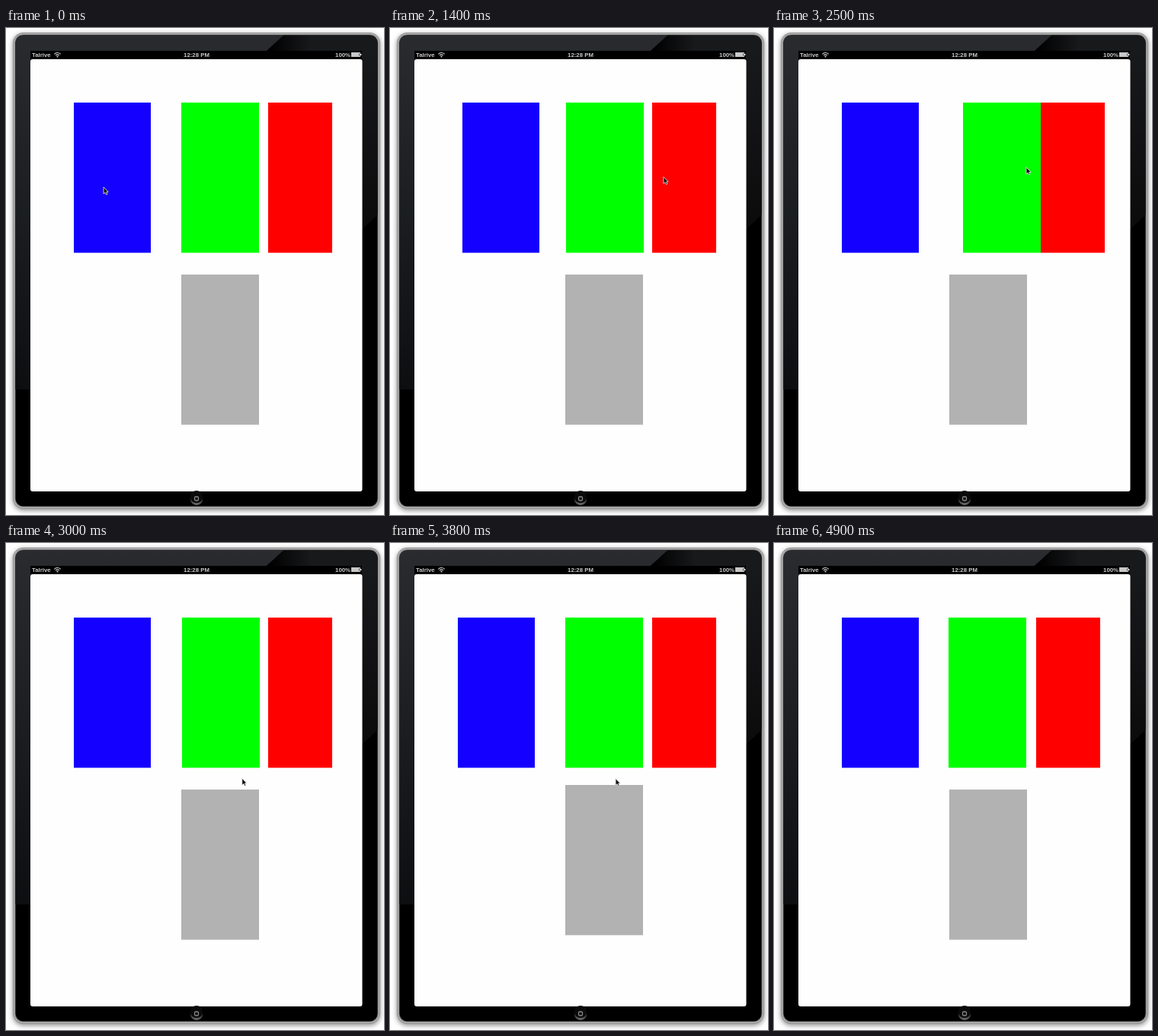
Recreate the animation shown at these times as an HTML page with a canvas. Size 496x640 px, loop 6000 ms.

```html
<!DOCTYPE html>
<html lang="en">
<head>
<meta charset="utf-8">
<title>Springy blocks</title>
<style>
html, body { margin: 0; width: 100%; height: 100%; overflow: hidden; background: #fff; }
canvas { display: block; }
</style>
</head>
<body>
<canvas id="stage" width="496" height="640"></canvas>
<script>
const ctx = document.getElementById('stage').getContext('2d');
const LOOP = 6000, STEP = 100, REST = 4900;

function inset(amount, radius, fill) {
  ctx.beginPath();
  ctx.roundRect(9 + amount, 6 + amount, 482 - 2 * amount, 626 - 2 * amount, radius);
  ctx.fillStyle = fill;
  ctx.fill();
}

function polygon(points, fill) {
  ctx.beginPath();
  points.forEach(([x, y]) => ctx.lineTo(x, y));
  ctx.closePath();
  ctx.fillStyle = fill;
  ctx.fill();
}

function gradient(x0, y0, x1, y1, ...colors) {
  const g = ctx.createLinearGradient(x0, y0, x1, y1);
  colors.forEach((c, i) => g.addColorStop(i / (colors.length - 1), c));
  return g;
}

function arc(x, y, r, from = 0, to = 2 * Math.PI) {
  ctx.beginPath();
  ctx.arc(x, y, r, from, to);
}

function drawDevice() {
  ctx.fillStyle = '#fff';
  ctx.fillRect(0, 0, 496, 640);

  ctx.save();
  ctx.shadowColor = 'rgba(0,0,0,.45)';
  ctx.shadowBlur = 6;
  ctx.shadowOffsetY = 2;
  inset(0, 14, '#929292');
  ctx.restore();
  inset(1, 13, '#b4b4b4');
  inset(2.5, 11, '#747474');
  inset(3.5, 10, '#000');

  // Glass reflection, cut by a diagonal edge along the top
  ctx.save();
  ctx.clip();
  polygon([[12, 9], [365, 9], [342, 30], [32, 30], [32, 475], [12, 475]],
    gradient(0, 9, 0, 475, '#292b2f', '#1b1e21', '#0c0e10'));
  polygon([[365, 9], [488, 9], [488, 30], [342, 30]],
    gradient(345, 0, 400, 0, '#000', '#18191b'));
  polygon([[467, 30], [488, 30], [488, 245], [467, 265]],
    gradient(0, 30, 0, 265, '#18191b', '#0b0b0c'));
  ctx.restore();

  ctx.fillStyle = '#000';
  ctx.fillRect(32, 30, 435, 20);
  ctx.beginPath();
  ctx.roundRect(32, 41, 435.5, 568, 3);
  ctx.fillStyle = '#fefefe';
  ctx.fill();
  drawHomeButton();
  drawStatusBar();
}

function drawHomeButton() {
  arc(250, 618.5, 8.5);
  ctx.fillStyle = gradient(0, 610, 0, 627, '#050505', '#111', '#777');
  ctx.fill();
  arc(250, 616, 8);
  ctx.fillStyle = '#0a0a0a';
  ctx.fill();
  ctx.strokeStyle = '#8a8a8a';
  ctx.lineWidth = 1.3;
  ctx.beginPath();
  ctx.roundRect(247.5, 616, 5, 5, 1.6);
  ctx.stroke();
}

function label(text, x, align) {
  ctx.textAlign = align;
  ctx.fillText(text, x, 38);
}

function drawStatusBar() {
  ctx.font = 'bold 7.8px "Liberation Sans", Arial, sans-serif';
  ctx.fillStyle = ctx.strokeStyle = '#c8c8c8';
  label('Talrive', 34, 'left');
  label('12:28 PM', 250, 'center');
  label('100%', 452, 'right');

  ctx.lineWidth = 1.2;
  for (const r of [3, 5.5]) {
    arc(67.5, 38, r, -Math.PI * 0.77, -Math.PI * 0.23);
    ctx.stroke();
  }
  arc(67.5, 37.5, 1.1);
  ctx.fill();

  ctx.lineWidth = 1;
  ctx.strokeRect(453.5, 32.5, 11, 5);
  ctx.fillRect(454, 33, 9.5, 4);
  ctx.fillRect(465, 34, 1.5, 2);
}

// A push away from home, followed by a damped spring back
function pulse(t, start, peak, size) {
  if (t <= start) return 0;
  if (t < peak) return size * Math.sin((t - start) / (peak - start) * Math.PI / 2);
  const s = (t - peak) / 1000, damping = 3.9, speed = 5.2;
  return size * Math.exp(-damping * s) *
    (Math.cos(speed * s) + damping / speed * Math.sin(speed * s));
}

function drawBlock(x, y, w, color) {
  ctx.fillStyle = color;
  ctx.fillRect(Math.round(x), Math.round(y), w, 197.4);
}

function drawBlocks(t) {
  const blueX = pulse(t, 700, 1050, 48);
  const greenX = pulse(t, 850, 1050, 10) + pulse(t, 2300, 2600, 20.5) + pulse(t, 4200, 4400, 10);
  const greenY = pulse(t, 4200, 4400, -0.8);
  const redX = pulse(t, 750, 1000, 7.2) + pulse(t, 2400, 2600, 9);
  const grayY = pulse(t, 3400, 3600, -11.3);
  drawBlock(89 + blueX, 98, 101, '#1400ff');
  drawBlock(230 + greenX, 98 + greenY, 102, '#0f0');
  drawBlock(344 + redX, 98, 84, '#f00');
  drawBlock(230, 324 + grayY, 102, '#b2b2b2');
}

// Pointer stops: time, x, y
const stops = [
  [650, 128, 209], [900, 380, 210], [1800, 342, 184], [2300, 308, 184],
  [2500, 331, 183], [3300, 297, 385], [3500, 305, 269], [4100, 287, 350],
  [4400, 348, 191], [4600, 478, 178]
];

function drawPointer(t) {
  const next = stops.findIndex(([time]) => time >= t);
  if (next < 0) return;
  const [t1, x1, y1] = stops[next], [t0, x0, y0] = stops[Math.max(0, next - 1)];
  const k = t1 > t0 ? (t - t0) / (t1 - t0) : 1;
  ctx.save();
  ctx.translate(x0 + (x1 - x0) * k, y0 + (y1 - y0) * k);
  polygon([[0, 0], [0, 9], [2, 7.2], [3.5, 10], [5, 9.4], [3.7, 6.6], [6.2, 6.4]], '#111');
  ctx.strokeStyle = '#eee';
  ctx.lineWidth = 0.8;
  ctx.stroke();
  ctx.restore();
}

const begin = performance.now();

function draw() {
  const elapsed = (performance.now() - begin) % LOOP;
  const t = Math.min(Math.floor(elapsed / STEP) * STEP, REST);
  drawDevice();
  drawBlocks(t);
  drawPointer(t);
  requestAnimationFrame(draw);
}
draw();
</script>
</body>
</html>
```
